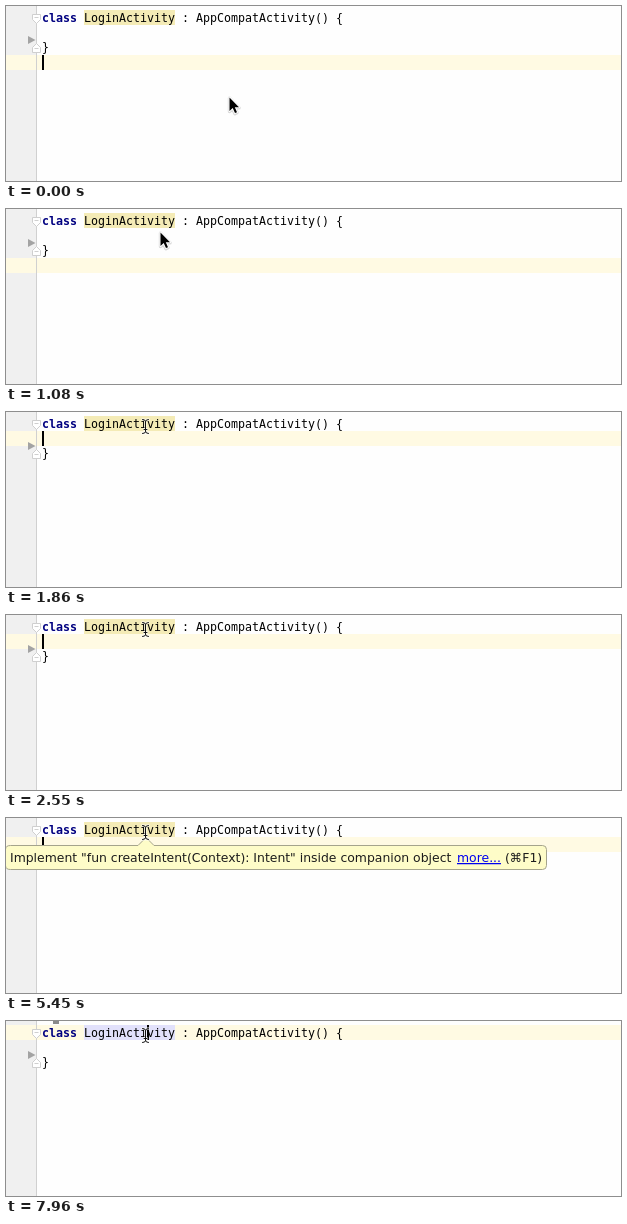
Recreate the animation shown at these times as an HTML page. Size 615 by 175 pixels, loop 8000 ms.

```html
<!DOCTYPE html>
<html lang="en">
<head>
<meta charset="utf-8">
<title>Editor hint</title>
<style>
  html, body { margin: 0; width: 100%; height: 100%; overflow: hidden; background: #fefefe; }
  svg { display: block; width: 615px; height: 175px; }
  text { white-space: pre; }
  .code { font: 11.63px "DejaVu Sans Mono", monospace; fill: #000; }
  .key { font-weight: bold; fill: #000080; }
  .tip { font: 12.41px "DejaVu Sans", sans-serif; fill: #1c1c1c; }
  .link { fill: #0000f0; text-decoration: underline; }
</style>
</head>
<body>
<svg viewBox="0 0 615 175">
  <defs>
    <path id="ibeam" d="M-3 -7Q0 -7 0 -5V5Q0 7 -3 7M3 -7Q0 -7 0 -5M0 5Q0 7 3 7M-1.5 3H1.5"/>
    <path id="tipArrow" d="M0 0V13.5L3.2 10.6L5.5 15.6L7.5 14.7L5.3 9.8H9.5Z"/>
  </defs>
  <rect width="615" height="175" fill="#fefefe"/>
  <rect width="30" height="175" fill="#f0f0f0"/>
  <rect id="row" width="615" height="15" fill="#fffae3"/>
  <rect x="30" width="1" height="175" fill="#d0d0d0"/>
  <path d="M22 30L29.5 34L22 38Z" fill="#a3a3a3"/>
  <g fill="#fff" stroke="#cfcfcf">
    <path d="M26.5 8.5h8v5l-4 4l-4 -4zM28.5 11.5h4"/>
    <path d="M26.5 46.5h8v-5l-4 -4l-4 4zM28.5 42.5h4"/>
  </g>
  <rect id="mark" x="78" y="4" width="91" height="15"/>
  <text class="code" x="36" y="16"><tspan class="key">class</tspan> LoginActivity : AppCompatActivity() {</text>
  <text class="code" x="36" y="45">}</text>
  <rect id="bulb" x="47" y="0" width="6" height="3" fill="#8b8b8b"/>
  <rect id="caret" width="2" height="15" fill="#000"/>
  <g id="hint">
    <path d="M4.5 27.5H132L140 19.5L148 27.5H536.5Q540.5 27.5 540.5 31.5V47.5Q540.5 51.5 536.5 51.5H4.5Q-0.5 51.5 -0.5 47.5V31.5Q-0.5 27.5 4.5 27.5Z" fill="#fefcc8" stroke="#a5a48c"/>
    <text class="tip" x="4" y="44">Implement "fun createIntent(Context): Intent" inside companion object</text>
    <text class="tip link" x="451" y="44">more...</text>
    <text class="tip" x="499" y="44">(⌘F1)</text>
  </g>
  <g id="arrow" stroke-linejoin="round">
    <use href="#tipArrow" y="0.6" stroke="#000" stroke-opacity=".15" stroke-width="3.4"/>
    <use href="#tipArrow" stroke="#fff" stroke-width="2"/>
    <use href="#tipArrow"/>
  </g>
  <g id="beam" fill="none" stroke-linecap="round">
    <use href="#ibeam" stroke="#fff" stroke-width="2.4" stroke-opacity=".7"/>
    <use href="#ibeam" stroke="#111"/>
  </g>
</svg>
<script>
const LOOP = 8000, BLINK = 494;
const BEAM_AT = 1590, MARK_AT = 6950, BULB_AT = 7460;

// where each click puts the caret
const clicks = [
  { at: -800, x: 36, y: 49 },
  { at: 1130, x: 36, y: 19 },
  { at: 6560, x: 141, y: 4 }
];
// glides of the pointer, each ending at x, y
const glides = [
  { from: 20, to: 110, x: 218, y: 85 },
  { from: 370, to: 1080, x: 154, y: 23 },
  { from: 1220, to: 1520, x: 142, y: 14 },
  { from: 1520, to: BEAM_AT, x: 139, y: 14 }
];

const el = id => document.getElementById(id);
const [row, mark, bulb, caret, hint, arrow, beam] =
  ["row", "mark", "bulb", "caret", "hint", "arrow", "beam"].map(el);
const within = (t, a, b) => t >= a && t < b;
const show = (node, on) => node.setAttribute("visibility", on ? "visible" : "hidden");
const ease = u => u * u * (3 - 2 * u);
const blinkNo = t => Math.floor((t - 15) / BLINK);

function pointer(t) {
  let x = 223, y = 91;
  for (const g of glides) {
    const u = ease(Math.min(1, Math.max(0, (t - g.from) / (g.to - g.from))));
    x += (g.x - x) * u;
    y += (g.y - y) * u;
  }
  return [Math.round(x) + 0.5, Math.round(y) + 0.5];
}

// A click shows the caret and makes it skip one blink.
function caretOn(t, clickAt) {
  const n = blinkNo(t) - blinkNo(clickAt);
  return n === 0 || n % 2 === 1;
}

function draw(t) {
  const click = clicks.filter(c => c.at <= t).pop();
  row.setAttribute("y", click.y);
  caret.setAttribute("x", click.x);
  caret.setAttribute("y", click.y);
  show(caret, caretOn(t, click.at));

  mark.setAttribute("fill", t < MARK_AT ? "#f4ebb6" : "#e2e1fb");
  show(bulb, t >= BULB_AT);
  show(hint, within(t, 1620, 1860) || within(t, 2670, clicks[2].at));

  const onBeam = t >= BEAM_AT;
  show(arrow, !onBeam);
  show(beam, onBeam);
  (onBeam ? beam : arrow).setAttribute("transform", `translate(${pointer(t)})`);
}

function tick() {
  draw(performance.now() % LOOP);
  requestAnimationFrame(tick);
}
tick();
</script>
</body>
</html>
```
